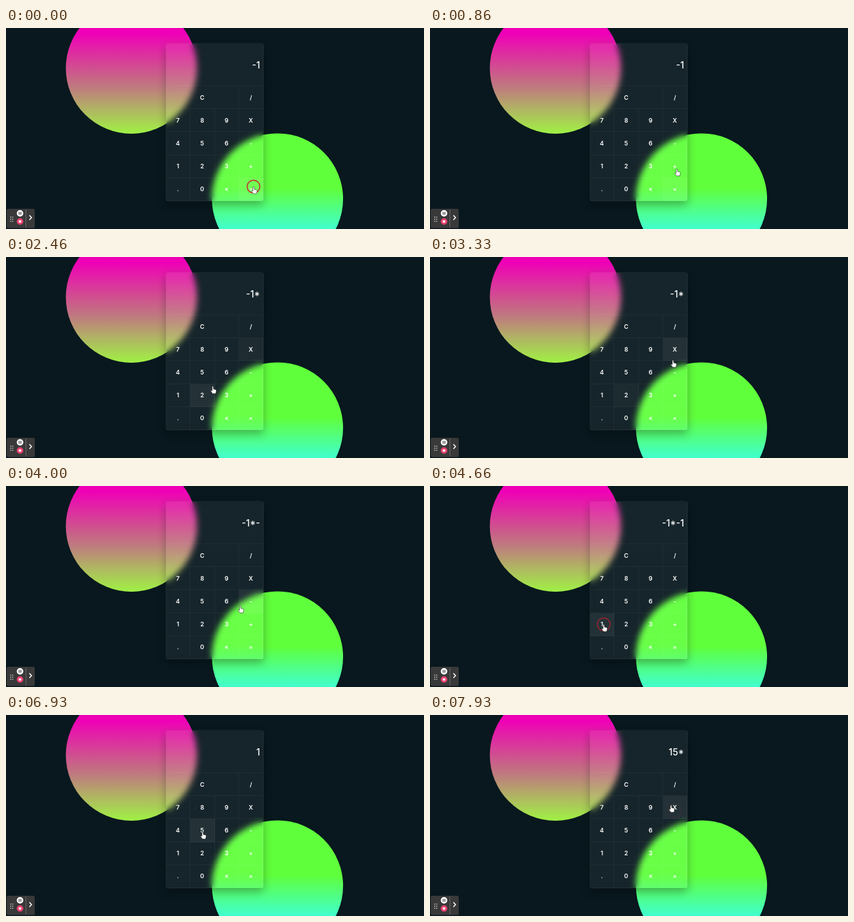
An HTML page for the animation above (8 s loop, 640x308 px).

```html
<!DOCTYPE html>
<html lang="en">
<head>
<meta charset="utf-8">
<title>Glass calculator</title>
<style>
  html, body { margin: 0; width: 100%; height: 100%; overflow: hidden; background: #08181e; }
  .stage { position: relative; width: 640px; height: 308px; overflow: hidden; font-family: Inter, sans-serif; color: #fff; }
  .stage > * { position: absolute; }
  .disc { inset: 0; }
  .pink {
    background: linear-gradient(#ef00b7 8px, #d0508f 62px, #be7c7e 92px, #b0b562 125px, #a0ee46 160px);
    clip-path: circle(100.4px at 192px 61.6px);
  }
  .green {
    background: linear-gradient(#60ff3c 246px, #40ffd2 310px);
    clip-path: circle(100.4px at 415.7px 261.8px);
  }
  .calc {
    left: 245px; top: 24px; width: 149px; height: 241px;
    display: grid; grid-template: 65px repeat(5, 35.2px) / repeat(4, 37.25px);
    border-radius: 3px; overflow: hidden;
    background: rgba(255, 255, 255, .06);
    backdrop-filter: blur(5px);
    box-shadow: 0 6px 14px rgba(0, 0, 0, .3), 0 0 0 .7px rgba(255, 255, 255, .09);
  }
  .calc > * {
    display: flex; align-items: center; justify-content: center; box-sizing: border-box;
    border: solid rgba(255, 255, 255, .045); border-width: 0 1px 1px 0;
    font-size: 9.2px; font-weight: 600;
  }
  .calc .display {
    grid-column: span 4; justify-content: flex-end; padding-right: 4px;
    font-size: 14px; font-weight: 500;
  }
  .calc .clear { grid-column: span 3; }
  svg { inset: 0; }
</style>
</head>
<body>
<div class="stage">
  <div class="disc pink"></div>
  <div class="disc green"></div>
  <div class="calc"><div class="display"></div></div>
  <svg width="640" height="308">
    <g id="recorder">
      <rect x="1" y="277" width="43" height="29.5" rx="2.5" fill="#393939"/>
      <path d="M7.3 289v8M10.3 289v8" stroke="#ccc" stroke-width="1.4" stroke-dasharray="1.4 1.9"/>
      <circle cx="21.5" cy="284" r="5" fill="#fff"/>
      <path d="M20.2 281.8v4.4M22.8 281.8v4.4" stroke="#333" stroke-width="1.2"/>
      <circle cx="21.5" cy="296.5" r="5" fill="#e8406e"/>
      <rect x="19.7" y="294.7" width="3.6" height="3.6" rx=".6" fill="#fff"/>
      <path d="M30.5 278v27.5" stroke="#666"/>
      <path d="M35.8 287l3.3 3.5-3.3 3.5" fill="none" stroke="#fff" stroke-width="1.5"/>
    </g>
    <circle id="ring" r="9.8" fill="none" stroke="#d01c30" stroke-width="1.4"/>
    <path id="hand" fill="#fff" stroke="#222" stroke-width=".6" stroke-linejoin="round"
      d="M-1 .8Q0-.8 1 .8V4L4.6 5Q5.7 5.4 5.4 7L4.6 11H-.3L-3 7.3Q-3.2 5.9-1.7 6.3L-1 7Z"/>
  </svg>
</div>
<script>
const LOOP = 8000;
const LABELS = ['C', '/', '7', '8', '9', 'X', '4', '5', '6', '-', '1', '2', '3', '+', '.', '0', '«', '='];

// [time, x, y] of the pointer tip
const PATH = [
  [0, 379, 243], [560, 379, 243], [1430, 375, 144], [2100, 375, 144], [2600, 303, 211],
  [2950, 303, 213], [3330, 372, 158], [3560, 376, 177], [3850, 376, 178], [4450, 266, 212],
  [4750, 266, 212], [5330, 380, 246], [5500, 380, 246], [5730, 385, 249], [6060, 385, 249],
  [6780, 301, 179], [7200, 301, 179], [7680, 375, 147], [7780, 375, 147], [7930, 369, 138], [LOOP, 369, 138]
];
// [time, display text after the click]
const CLICKS = [[0, '-1'], [1900, '-1*'], [3700, '-1*-'], [4600, '-1*-1'], [5450, '1'], [7080, '15'], [7730, '15*']];
// [key, pointer enters, pointer leaves]
const HOVERS = [
  ['=', 0, 720], ['X', 1300, 2250], ['2', 2450, 3030], ['X', 3200, 3400], ['-', 3400, 4000],
  ['1', 4330, 4850], ['=', 5200, 6200], ['5', 6600, 7350], ['X', 7530, LOOP]
];
const FADE = 500, RING_TIME = 220;

const calc = document.querySelector('.calc');
const display = document.querySelector('.display');
const ring = document.getElementById('ring');
const hand = document.getElementById('hand');
const keys = LABELS.map(label => {
  const key = document.createElement('div');
  key.textContent = label;
  if (label === 'C') key.className = 'clear';
  calc.append(key);
  return key;
});

const ease = p => p * p * (3 - 2 * p);

function pointerAt(t) {
  const i = PATH.findIndex(point => point[0] > t);
  const [t0, x0, y0] = PATH[i - 1], [t1, x1, y1] = PATH[i];
  const p = ease((t - t0) / (t1 - t0));
  return [x0 + (x1 - x0) * p, y0 + (y1 - y0) * p];
}

function glow(label, t) {
  const levels = HOVERS
    .filter(([key, enter]) => key === label && t >= enter)
    .map(([, , leave]) => Math.min(1, 1 - (t - leave) / FADE));
  return Math.max(0, ...levels);
}

function draw(t) {
  const [x, y] = pointerAt(t);
  hand.setAttribute('transform', `translate(${x} ${y})`);

  const [clicked, text] = CLICKS.filter(click => click[0] <= t).pop();
  display.textContent = text;
  const [cx, cy] = pointerAt(clicked);
  ring.setAttribute('transform', `translate(${cx} ${cy})`);
  ring.setAttribute('opacity', Math.max(0, 1 - (t - clicked) / RING_TIME));

  keys.forEach((key, i) => {
    key.style.background = `rgba(255, 255, 255, ${0.06 * glow(LABELS[i], t)})`;
  });
}

const start = performance.now();
function tick() {
  draw((performance.now() - start) % LOOP);
  requestAnimationFrame(tick);
}
tick();
</script>
</body>
</html>
```
